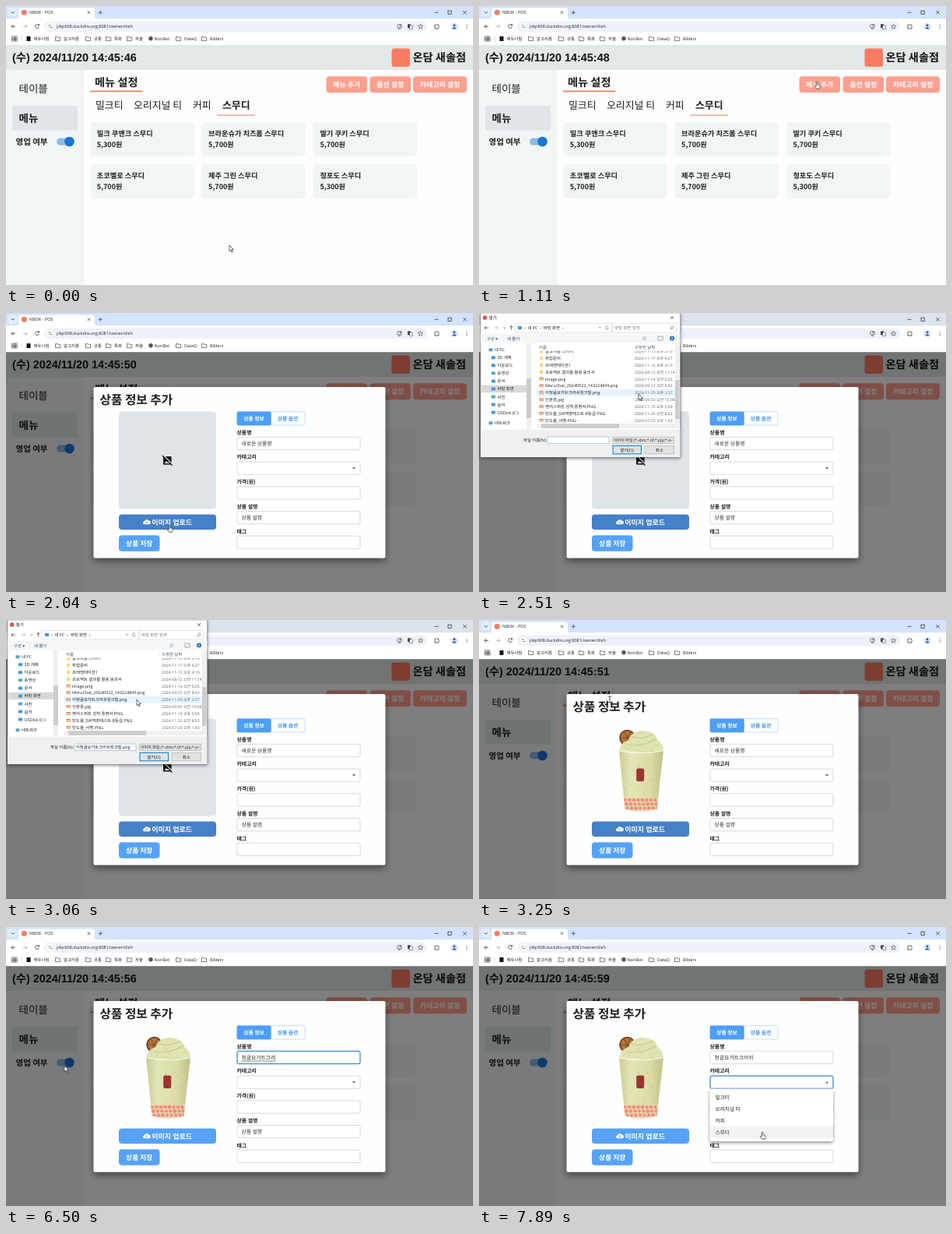
An HTML page that plays this animation: 600x358 px, repeating every 7990 ms.

```html
<!DOCTYPE html>
<html>
<head>
<meta charset="utf-8">
<title>POS</title>
<style>
  html, body { margin: 0; width: 100%; height: 100%; overflow: hidden; background: #fff; }
  svg { display: block; width: 600px; height: 358px; text-rendering: geometricPrecision;
    font-family: 'Noto Sans CJK KR', 'Noto Sans CJK', 'Noto Sans', sans-serif; }
  .ui { font-family: 'Open Sans', 'Noto Sans CJK KR', sans-serif; }
  .clock { font-family: 'Liberation Sans', 'Noto Sans CJK KR', sans-serif; }
  .b { font-weight: 700; }
  .mid { text-anchor: middle; }
  #modal, #options, #cursor, #files { animation: 7990ms linear infinite; }
  #modal { animation-name: modal; }
  #options { animation-name: options; filter: drop-shadow(0 2px 2px #0006); }
  #files { animation-name: scroll; }
  #cursor { animation-name: cursor; animation-timing-function: ease-in-out; }
  #paper { filter: drop-shadow(0 4px 5px #0007); }
  #dialog { filter: drop-shadow(0 1px 2px #0008); }
  @keyframes modal { 0%, 14.1% { opacity: 0 } 16.1%, 100% { opacity: 1 } }
  @keyframes options { 0%, 93.7% { opacity: 0 } 95.2%, 100% { opacity: 1 } }
  @keyframes scroll { 0%, 29.2% { transform: translateY(44px) } 31.2%, 100% { transform: none } }
  @keyframes cursor {
    0%, 1.1% { transform: translate(287px, 307px) }
    3.5%, 8.1% { transform: translate(291px, 304px) }
    12.8%, 18.6% { transform: translate(434px, 97px) }
    23.3%, 26.8% { transform: translate(210px, 272px) }
    27.9% { transform: translate(209px, 211px) }
    31.4%, 32.5% { transform: translate(205px, 104px) }
    34.8%, 40.7% { transform: translate(168px, 102px) }
    43.5%, 44.8% { transform: translate(345px, 168px) }
    47.6%, 88.4% { transform: translate(75px, 178px) }
    91.9%, 93.6% { transform: translate(370px, 199px) }
    97.4%, 100% { transform: translate(364px, 263px) }
  }
</style>
</head>
<body>
<svg id="stage" viewBox="0 0 600 358"></svg>
<script>
const LOOP = 7990;
const CORAL = '#fb7a63', BLUE = '#55a2f8', PALE = '#f1f5f6';

const text = (x, y, size, str, cls = '', fill = '#1c1c1c', more = '') =>
  `<text x="${x}" y="${y}" font-size="${size}" class="${cls}" fill="${fill}" ${more}>${str}</text>`;
const rect = (x, y, w, h, fill, r = 0, more = '') =>
  `<rect x="${x}" y="${y}" width="${w}" height="${h}" rx="${r}" fill="${fill}" ${more}/>`;
const disc = (x, y, r, fill, more = '') => `<circle cx="${x}" cy="${y}" r="${r}" fill="${fill}" ${more}/>`;
const line = (d, color = '#444', w = 0.8, more = '') =>
  `<path d="${d}" fill="none" stroke="${color}" stroke-width="${w}" ${more}/>`;
const shape = (d, fill, more = '') => `<path d="${d}" fill="${fill}" ${more}/>`;
const group = (id, ...parts) => `<g id="${id}">${parts.join('')}</g>`;
const edge = (color, w = 0.6) => `stroke="${color}" stroke-width="${w}"`;
const button = (x, y, w, h, str, size, fill, id = '') =>
  rect(x, y, w, h, fill, 4, id && `id="${id}"`) + text(x + w / 2, y + h / 2 + size * 0.36, size, str, 'b mid', '#fff');
const folder = (x, y) => shape(`M${x} ${y}h2.4l.8 .9h3v4.3h-6.2z`, 'none', edge('#444', 0.7));

function browser() {
  const marks = [[74, '알고리즘'], [113, '공통'], [139, '특화'], [166, '자율'], [229, 'DataQ'], [262, 'Bilders']];
  return [
    rect(0, 0, 600, 16.5, '#d3e3fd', 0, 'id="strip"'),
    rect(3, 2.5, 11, 11, '#e4eefe', 3), line('M6.8 7.2l2 2 2-2', '#222'),
    shape('M13 16.5q3 0 3-3v-8q0-3 3-3h92q3 0 3 3v8q0 3 3 3z', '#fff'),
    disc(23.3, 8.3, 3.5, CORAL), text(30, 10.3, 5.5, 'NBOK - POS', 'ui'),
    line('M104.8 6.6l3.4 3.4m0-3.4l-3.4 3.4', '#333', 0.7),
    line('M118.8 8.3h5m-2.5-2.5v5', '#333', 0.7),
    line('M550.5 8.3h5M587.3 6.1l4.4 4.4m0-4.4l-4.4 4.4', '#222', 0.7),
    rect(568, 6.1, 4.2, 4.2, 'none', 0, edge('#222', 0.7)),
    rect(0, 16.5, 600, 33.7, '#fff'),
    line('M12 26.3h-5m2.4-2.4l-2.4 2.4 2.4 2.4', '#333'),
    line('M22 26.3h5m-2.4-2.4l2.4 2.4-2.4 2.4', '#aaa'),
    line('M42.2 24.6a2.5 2.5 0 1 0 .3 2.2M42.6 23v2h-2', '#333'),
    rect(49, 19.5, 492, 13.5, '#edf2fa', 6.7), disc(57, 26.3, 4.6, '#fff'),
    line('M54.8 25h2.6m1.6 0h.3M54.8 27.6h.6m1.6 0h2.4', '#333'),
    text(65, 28.3, 5.5, 'jdqr608.duckdns.org:8081/owner/dish', 'ui', '#222'),
    rect(502.8, 23.8, 5.4, 4, 'none', 0.5, edge('#333')), line('M504 29.2h3m-.6-6v3', '#333'),
    rect(516, 23.2, 4, 5, '#444', 0.6), rect(518.5, 25, 4, 4.6, '#fff', 0.6, edge('#444')),
    line('M532.5 23.2l.9 2 2.2.2-1.7 1.5.5 2.2-1.9-1.2-1.9 1.2.5-2.2-1.7-1.5 2.2-.2z', '#333', 0.6),
    shape('M551 24.2h1.6q.8-1.6 1.6 0h1.6v1.7q1.5.8 0 1.6v1.6h-4.8z', 'none', edge('#333', 0.8)),
    disc(576, 26.3, 4.6, '#d3e3fd'), disc(576, 24.8, 1.4, '#1d4f9c'), shape('M573.2 29.2q2.8-4 5.6 0z', '#1d4f9c'),
    [24, 26.3, 28.6].map(y => disc(592, y, 0.6, '#333')).join(''),
    [8.5, 11, 13.5].map(x => [39.7, 42, 44.3].map(y =>
      rect(x - 0.8, y - 0.8, 1.6, 1.6, 'none', 0, edge('#444', 0.5))).join('')).join(''),
    line('M20 38.5v7', '#c6d5ee'),
    rect(26.5, 39, 5, 6, '#111'), text(35.5, 43.9, 5.4, '에듀나림', 'ui'),
    marks.map(([x, s]) => folder(x - 10.5, 39.4) + text(x, 43.9, 5.4, s, 'ui')).join(''),
    disc(186, 41.8, 2.7, '#555'), text(190.5, 43.9, 5.4, 'NoriBot', 'ui')
  ].join('');
}

function page() {
  const dishes = [['밀크 쿠앤크 스무디', '5,300'], ['브라운슈가 치즈폼 스무디', '5,700'], ['딸기 쿠키 스무디', '5,700'],
    ['초코멜로 스무디', '5,700'], ['제주 그린 스무디', '5,700'], ['청포도 스무디', '5,300']];
  const card = ([name, price], i) => {
    const x = 108 + (i % 3) * 143.3, y = 149 + Math.floor(i / 3) * 54;
    return rect(x, y, 133.5, 44, PALE, 5) + text(x + 8.8, y + 17.6, 9.2, name, 'b') +
      text(x + 8.8, y + 31.8, 9, price + '원', 'b');
  };
  return [
    rect(0, 50, 600, 308, '#fdfdfd'), rect(0, 82, 100, 276, PALE), rect(0, 50, 600, 32, '#e2e8e8'),
    text(8, 71.3, 14.4, '', 'clock b', '#111', 'id="time"'),
    rect(495.5, 54.5, 23.5, 23.5, CORAL, 3),
    text(522.5, 71.3, 14.2, '온담 새솔점', 'b', '#111'),
    text(16.5, 111, 13.5, '테이블'),
    rect(8, 128, 84, 31.5, '#e0e6e8', 2), text(16.5, 149, 13.5, '메뉴', 'b'),
    text(12.5, 177.5, 10.5, '영업 여부', 'b'),
    rect(65, 169.5, 22, 9, '#8cb9e9', 4.5), disc(81.5, 174, 6.3, '#1976d2'),
    text(114, 103.3, 14.2, '메뉴 설정', 'b'), rect(108, 108.6, 67, 1.8, CORAL),
    text(115, 131.7, 12.9, '밀크티'), text(164, 131.7, 12.9, '오리지널 티'), text(240, 131.7, 12.9, '커피'),
    text(278, 131.7, 12.9, '스무디', 'b'), rect(271, 139.6, 49, 1, CORAL),
    button(411.5, 90.3, 52.5, 21, '메뉴 추가', 9, '#ff9f8e'),
    button(467.5, 90.3, 52.5, 21, '옵션 설정', 9, '#ff9f8e'),
    button(523, 90.3, 69, 21, '카테고리 설정', 9, '#ff9f8e'),
    dishes.map(card).join('')
  ].join('');
}

function drink() {
  const noise = n => Math.abs(Math.sin(n * 12.9898) * 43758.5453) % 1;
  const cup = 'M180 168h57l-8.500 74.500q-21 6-41 0z';
  let pearls = '', specks = '';
  for (let i = 0; i < 24; i++) {
    const row = i % 3;
    pearls += disc(188 + row * 1.3 + Math.floor(i / 3) * 5.5, 231 + row * 5.2, 2 + noise(i) * 0.5, '#ee8f7c');
  }
  for (let i = 0; i < 70; i++)
    specks += disc(184 + noise(i) * 48, 150 + noise(i + 99) * 74, 0.6, i % 2 ? '#b9b877' : '#f0f0cc');
  return group('drink',
    rect(144, 126, 127, 126, '#fefefe'),
    `<linearGradient id="glass"><stop stop-color="#c9cc92"/><stop offset=".25" stop-color="#e4e5b8"/>
      <stop offset=".7" stop-color="#d9dba4"/><stop offset="1" stop-color="#bfc287"/></linearGradient>
    <clipPath id="cup"><path d="${cup}M180 168q1-11 12-14q5-13 20-12q16 2 17 12q8 4 8 14z"/></clipPath>`,
    disc(190.5, 151, 10.3, '#6b4024'), disc(190.5, 151, 8.4, '#b8743a'),
    line('M182 151h17M186.500 143.500l8 15M194.500 143.500l-8 15', '#6b4024'),
    shape('M180 169q1-12 12-15q5-13 20-12q16 2 17 12q8 4 8 15z', '#e0e2b0'),
    line('M190 160q18 3 38-7M196 150q14 4 28-4', '#cdcf96', 1.6),
    shape(cup, 'url(#glass)'),
    `<g clip-path="url(#cup)">${rect(180, 228, 57, 20, '#efd2b0')}${pearls}${specks}</g>`,
    line('M179.500 167.500q29 6 58 0', '#f2f3dc', 1.4),
    rect(202.2, 190.5, 10, 16.5, '#9c3430', 2));
}

function modal() {
  const labels = ['상품명', '카테고리', '가격(원)', '상품 설명', '태그'];
  const field = (label, i) => text(296.5, 155.7 + i * 31.7, 6.9, label, 'b') +
    rect(297, 159.3 + i * 31.7, 158, 16.3, '#fff', 2, edge('#c0c0c0'));
  const focus = (id, y) => rect(297, y, 158, 16.3, 'none', 2, `id="${id}" ${edge('#1976d2', 1)}`);
  const options = ['밀크티', '오리지널 티', '커피', '스무디'];
  return group('modal',
    rect(0, 50.2, 600, 308, '#000', 0, 'opacity=".5"'),
    rect(112.5, 95, 375, 219.5, '#fefefe', 2, 'id="paper"'),
    text(120.5, 117.4, 15.7, '상품 정보 추가', 'b'),
    rect(145, 126.5, 125, 125, '#dfe4e9', 4),
    rect(202, 184, 10.6, 10.6, '#111', 1.2), shape('M203.5 193l2.4-3 1.6 1.8 1.6-2 2 3.2z', '#dfe4e9'),
    line('M202 182.3l12 12', '#dfe4e9', 1.4), line('M201 183l12.6 12.6', '#111', 1.2),
    drink(),
    button(145, 258.5, 125, 19.6, '', 9, BLUE, 'upload'),
    shape('M178 271.2a2 2 0 0 1 0-4 2.9 2.9 0 0 1 5.4-.6 2.3 2.3 0 0 1 .3 4.6z', '#fff'),
    line('M180.7 270.6v-2.8m-1.2 1.1l1.2-1.2 1.2 1.2', '#4a93e6', 0.7),
    text(187.3, 271.5, 9, '이미지 업로드', 'b', '#fff'),
    button(145, 285.3, 52.5, 20.5, '상품 저장', 8.8, BLUE),
    rect(297, 126.7, 87, 17.3, '#fff', 2, edge('#9cc8fa')), rect(296.7, 126.4, 44, 17.9, '#4c9ff5', 2),
    text(318.5, 137.7, 6.8, '상품 정보', 'b mid', '#fff'), text(362, 137.7, 6.8, '상품 옵션', 'b mid', '#3f92ee'),
    labels.map(field).join(''),
    shape('M444.8 198.3h4.4l-2.2 2.3z', '#555', 'id="down"'), shape('M444.8 200.5h4.4l-2.2-2.3z', '#555', 'id="up"'),
    text(302.5, 170.1, 6.8, '', '', '#333', 'id="name"'), line('', '#333', 0.6, 'id="compose"'),
    text(302.5, 265.2, 6.8, '상품 설명', '', '#333'),
    focus('nameFocus', 159.3), focus('selectFocus', 191),
    group('options',
      rect(296.5, 207.5, 158.5, 67.5, '#fff', 2), rect(296.5, 256, 158.5, 15.2, '#f2f2f2', 0, 'id="hover"'),
      options.map((s, i) => text(303.5, 221 + i * 15, 6.7, s, '', '#222')).join('')));
}

function dialog() {
  const files = [
    ['강의자료', '2024-11-19 오후 6:12', 0], ['개인 문서', '2024-11-18 오후 1:05', 0],
    ['공통 프로젝트', '2024-10-02 오전 9:47', 0], ['면접 준비', '2024-11-12 오후 2:30', 0],
    ['스터디 자료', '2024-11-08 오후 8:21', 0], ['알고리즘 스터디', '2024-11-15 오후 3:19', 0],
    ['취업준비', '2024-11-17 오후 4:27', 0], ['프레젠테이션1', '2024-11-15 오후 4:19', 0],
    ['프로젝트 결과물 활용 동의서', '2024-08-12 오전 11:14', 0], ['image.png', '2024-11-14 오전 9:25', 1],
    ['MoruChat_20240922_143224849.png', '2024-09-23 오전 8:43', 1], ['이청귤요거트크러쉬링크털.png', '2024-11-20 오후 2:37', 1],
    ['신분증.jpg', '2024-09-03 오전 10:08', 1], ['영어스피킹 성적 증명서.PNG', '2024-11-15 오후 5:09', 1],
    ['민도율_SW역량테스트 B등급.PNG', '2024-11-20 오전 8:53', 1], ['민도율_서명.PNG', '2024-07-29 오후 1:43', 1]];
  const row = ([name, date, image], i) => {
    const y = 49.2 + (i - 5) * 8.85;
    const icon = image ? rect(77.5, y - 1.9, 5.2, 3.8, '#d9804d') + rect(78.2, y - 0.4, 3.8, 1.6, '#f5e3d0')
      : rect(78.2, y - 2.3, 3.8, 4.6, '#f7d774', 0.4);
    return icon + text(85, y + 1.9, 5.4, name, 'ui') + text(200, y + 1.9, 5.1, date, 'ui', '#666');
  };
  const places = ['내 PC', '3D 개체', '다운로드', '동영상', '문서', '바탕 화면', '사진', '음악', 'OSDisk (C:)', '네트워크'];
  const place = (s, i) => {
    const y = 47.2 + i * 10.05 + (i === 9 ? 3.5 : 0), x = i % 9 ? 23.5 : 20;
    return rect(x - 7.5, y - 2, 5, 4, i % 3 ? '#3f9ad8' : '#58a6c4', 0.6) + text(x, y + 2, 5.4, s, 'ui');
  };
  return group('dialog',
    rect(2, 0, 256.5, 185, '#fff', 0, edge('#777', 0.5)),
    disc(7.6, 6, 2.7, '#dd5144'), text(12.5, 8, 5.6, '열기', 'ui'),
    line('M246 4l4 4m0-4l-4 4', '#222', 0.6),
    line('M12 19h-5m2-2l-2 2 2 2M31.5 18.500l1.2 1.2 1.2-1.2M41.500 21.500v-5m-2 2l2-2 2 2', '#333', 0.7),
    line('M19.5 19h5m-2-2l2 2-2 2', '#aaa', 0.7),
    rect(46, 13.5, 124, 11.5, '#fff', 0, edge('#d0d0d0')), rect(50, 17, 5, 4, '#3f9ad8'),
    text(58, 21, 5.4, '›&#160; 내 PC &#160;›&#160; 바탕 화면 &#160;›', 'ui'),
    line('M154 18l1.4 1.4 1.4-1.4M166.2 17.6a2 2 0 1 0 .3 2', '#444', 0.6),
    rect(171.5, 13.5, 82, 11.5, '#fff', 0, edge('#d0d0d0')), text(174, 21, 5.4, '바탕 화면 검색', 'ui', '#777'),
    disc(248.5, 18.5, 1.6, 'none', edge('#666')), line('M247.4 19.7l-1.8 1.8', '#666'),
    rect(2.3, 26.5, 256, 12, '#f5f6f7'),
    text(10, 34.7, 5.4, '구성 ▾', 'ui', '#2a4a78'), text(36, 34.7, 5.4, '새 폴더', 'ui', '#2a4a78'),
    line('M210 30.8h5M210 32.6h5M210 34.4h5', '#8aa4bc', 0.6), rect(230, 30, 6, 5, 'none', 0, edge('#777')),
    disc(248, 32.5, 3, '#1d72c4'), text(248, 34.5, 5, '?', 'ui b mid', '#fff'),
    rect(3, 92.7, 58, 9.4, '#d9d9d9'), places.map(place).join(''),
    rect(61, 39, 6, 110, '#f0f0f0'), rect(61, 84, 6, 51, '#cdcdcd'),
    `<clipPath id="list"><path d="M74 48h178v93.5h-178z"/></clipPath>`,
    rect(74, 97.9, 178, 8.8, '#e5f3ff', 0, 'id="row"'),
    `<g clip-path="url(#list)">${group('files', files.map(row).join(''))}</g>`,
    rect(74, 39, 178, 9.5, '#fff'), text(77, 46, 5.4, '이름', 'ui', '#456'), text(200, 46, 5.4, '수정한 날짜', 'ui', '#456'),
    line('M197 40v8', '#ddd', 0.5),
    rect(252, 39, 5.5, 103, '#f0f0f0'), rect(252, 86, 5.5, 50, '#cdcdcd'),
    rect(74, 142, 183, 6, '#f0f0f0'), rect(80, 142, 100, 6, '#cdcdcd'),
    rect(2.3, 149.5, 256, 35.3, '#f0f0f0'),
    text(57, 165.2, 5.4, '파일 이름(N):', 'ui'),
    rect(88, 159, 79, 8.6, '#fff', 0, edge('#7ab4e2')), text(90, 165.2, 5.3, '', 'ui', '#111', 'id="picked"'),
    rect(171.5, 159, 79, 8.6, '#e1e1e1', 0, edge('#adadad')),
    text(173, 165.2, 5, '이미지 파일 (*.xbm;*.tif;*.pjp;*.a', 'ui'), line('M245.5 162.6l1.4 1.4 1.4-1.4', '#444', 0.6),
    rect(172, 170.3, 36.5, 10.5, '#e1e1e1', 0, edge('#0078d7', 1)), text(190, 177.6, 5.4, '열기(O)', 'ui mid'),
    rect(213, 170.3, 37.5, 10.5, '#e1e1e1', 0, edge('#adadad')), text(231.7, 177.6, 5.4, '취소', 'ui mid'));
}

const pointer = group('cursor',
  shape('M0 0v7.6l1.7-1.6 1.3 2.8 1.2-.6-1.2-2.6h2.3z', '#fff', `id="arrow" ${edge('#222', 0.7)}`),
  shape('M-.7 .7q.9-1.2 1.7 0v3l2.6.7q.8.3.7 1.3l-.6 3.4h-4.3l-2.3-3.2q.2-1.2 1.3-.5l.9.7z', '#fff', `id="hand" ${edge('#222', 0.7)}`),
  line('M-1.8-4h1.5l.3.4.3-.4h1.5M0-3.6v7.2M-1.8 4h1.5l.3-.4.3.4h1.5', '#222', 0.8, 'id="beam"'));

stage.innerHTML = browser() + page() + modal() + dialog() + pointer;

const $ = id => document.getElementById(id);
const pointers = [[0, 'arrow'], [980, 'hand'], [1140, 'arrow'], [1800, 'hand'], [2180, 'arrow'], [3130, 'beam'],
  [3320, 'arrow'], [3440, 'beam'], [3620, 'arrow'], [7290, 'hand']];
const typed = [[0, '새로운 상품명'], [4640, 'ㅊ퍼'], [5010, 'ㅊ'], [5110, '처'], [5290, '청'], [5380, '청ㄱ'], [5480, '청구'],
  [5570, '청규'], [5660, '청귤'], [5850, '청귤ㅇ'], [5940, '청귤요'], [6030, '청귤요ㄱ'], [6130, '청귤요거'], [6220, '청귤요거트'],
  [6410, '청귤요거트크'], [6500, '청귤요거트크레'], [6590, '청귤요거트크러'], [6690, '청귤요거트크러쉬']];
const latest = (list, t) => list.findLast(([start]) => t >= start)[1];
const put = (id, str) => { if ($(id).textContent !== str) $(id).textContent = str; };
const show = (id, on) => { $(id).style.display = on ? '' : 'none'; };

function render(t) {
  const within = (a, b = LOOP) => t >= a && t < b;
  put('time', '(수) 2024/11/20 14:45:' + (47 + Math.floor((t - 90) / 650)));
  put('name', latest(typed, t));
  put('picked', within(2830) ? '이청귤요거트크러쉬링크털.png' : '');
  const end = 302.5 + $('name').getComputedTextLength();
  $('compose').setAttribute('d', `M302.5 172H${end}` + (t < 5010 ? `M${end + 0.5} 164v7.5` : ''));
  const kind = latest(pointers, t);
  for (const id of ['arrow', 'hand', 'beam']) show(id, id === kind);
  show('compose', within(4640, 7060));
  show('dialog', within(2080, 3130));
  show('row', within(2470));
  show('drink', within(3130));
  show('nameFocus', within(3530, 7430));
  show('selectFocus', within(7430));
  show('up', within(7480));
  show('down', !within(7480));
  show('hover', within(7780));
  $('upload').setAttribute('fill', within(1830, 3400) ? '#4580c9' : BLUE);
  $('strip').setAttribute('fill', within(2080, 3130) ? '#dde3ec' : '#d3e3fd');
}

let start;
function tick(now) {
  start ??= now;
  render((now - start) % LOOP);
  requestAnimationFrame(tick);
}
render(0);
requestAnimationFrame(tick);
</script>
</body>
</html>
```
